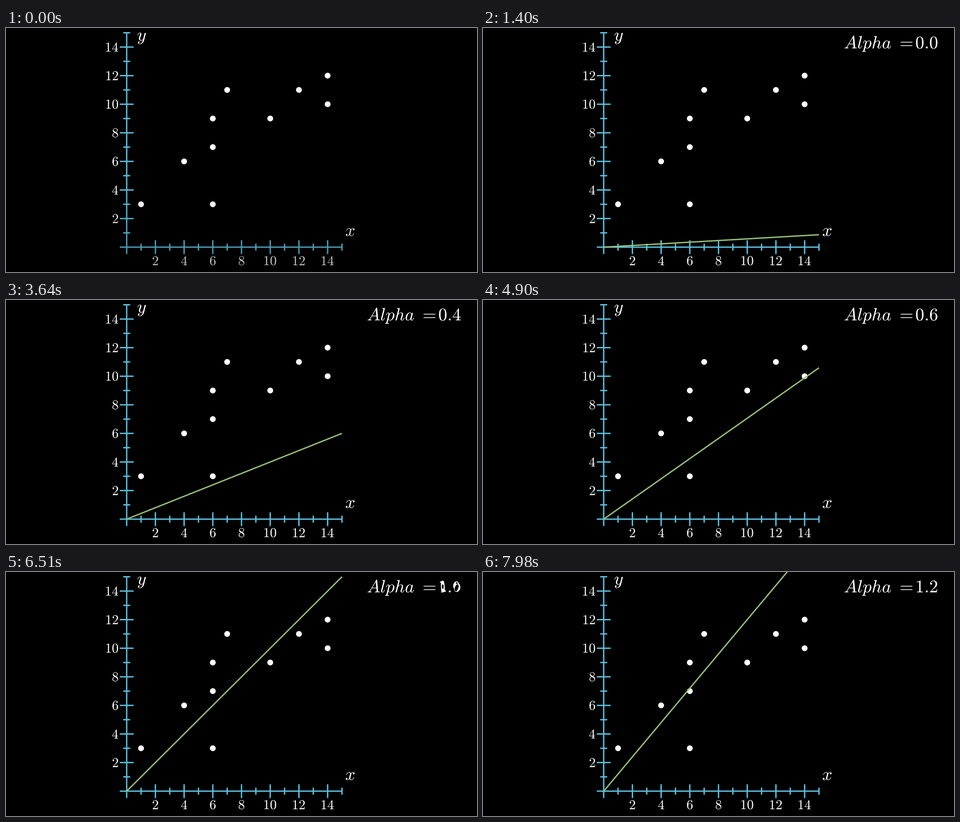
Recreate the animation shown at these times as a matplotlib script. Size 1038 by 540 pixels, loop 8000 ms.

```python
import numpy as np
import matplotlib.pyplot as plt
from matplotlib.animation import FuncAnimation
from matplotlib.collections import LineCollection
from matplotlib.patches import PathPatch
from matplotlib.path import Path
from matplotlib.textpath import TextPath

plt.rcParams["mathtext.fontset"] = "cm"

W, H, DPI = 1038, 540, 100
PX = 72 / DPI
LOOP, TICK, STEP = 8000, 20, 70

BLUE, GREEN = "#5bc3e1", "#97c079"
X0, Y0, UNIT = 266.0, H - 485, 31.63
STROKE, RADIUS, EM, LABEL_EM = 2.95, 6.4, 39.4, 30
POINTS = [(1, 3), (4, 6), (6, 3), (6, 7), (6, 9), (7, 11), (10, 9),
          (12, 11), (14, 10), (14, 12)]

# Timing in ms: the caption enters, then each cycle turns the line and the digits
INTRO, INTRO_TIME = 560, 560
TURN, TURN_TIME = 1330, 170
MORPH, MORPH_TIME = 1520, 640
CYCLE, CYCLES = 1161, 6
GLOW_TIME = 350


def smooth(u):
    u = np.clip(u, 0, 1)
    edge = 1 / (1 + np.exp(5))
    return float(np.clip((1 / (1 + np.exp(-10 * (u - 0.5))) - edge)
                         / (1 - 2 * edge), 0, 1))


def at(x, y):
    return X0 + UNIT * x, Y0 + UNIT * y


def moved(path, dx, dy):
    return Path(path.vertices + (dx, dy), path.codes)


def math_path(text, size):
    path = TextPath((0, 0), f"${text}$", size=size)
    return Path(path.vertices, path.codes)


def placed(text, size, x, y, anchor):
    """Put the glyph box at x (0 left, 0.5 middle, 1 right), centred on y."""
    path = math_path(text, size)
    box = path.get_extents()
    return moved(path, x - box.x0 - anchor * box.width, y - (box.y0 + box.y1) / 2)


def contours(path, count=80):
    rings = []
    for ring in path.to_polygons():
        length = np.r_[0, np.cumsum(np.hypot(*np.diff(ring, axis=0).T))]
        s = np.linspace(0, length[-1], count)
        rings.append(np.c_[np.interp(s, length, ring[:, 0]),
                           np.interp(s, length, ring[:, 1])])
    return rings


def blend(a, b, u):
    """Outline part of the way between two glyphs; spare rings shrink away."""
    rings_a, rings_b = contours(a), contours(b)
    parts = []
    for i in range(max(len(rings_a), len(rings_b))):
        ra = rings_a[i] if i < len(rings_a) else None
        rb = rings_b[i] if i < len(rings_b) else None
        if ra is None:
            ra = np.tile(rb.mean(axis=0), (len(rb), 1))
        if rb is None:
            rb = np.tile(ra.mean(axis=0), (len(ra), 1))
        parts.append(Path((1 - u) * ra + u * rb, closed=True))
    return Path.make_compound_path(*parts)


fig = plt.figure(figsize=(W / DPI, H / DPI), dpi=DPI, facecolor="black")
ax = fig.add_axes([0, 0, 1, 1])
ax.set_xlim(0, W)
ax.set_ylim(0, H)
ax.axis("off")


def fill(*paths, z):
    return ax.add_patch(PathPatch(Path.make_compound_path(*paths),
                                  fc="white", lw=0, snap=False, zorder=z))


# Axes, ticks and labels
segments = [[(X0 - 15.3, Y0), at(15, 0)], [(X0, Y0 - 15.3), at(0, 15)]]
labels = [placed("x", EM, 758.5, H - 451.7, 0.5), placed("y", EM, 299, H - 23, 0.5)]
for n in range(1, 16):
    half = 7.7 if n % 2 else 15.3
    x, y = at(n, n)
    segments += [[(x, Y0 - half), (x, Y0 + half)],
                 [(X0 - half, y), (X0 + half, y)]]
    if n % 2 == 0:
        labels += [placed(str(n), LABEL_EM, x, H - 515, 0.5),
                   placed(str(n), LABEL_EM, 247, y, 1)]
ax.add_collection(LineCollection(segments, colors=BLUE, linewidths=STROKE * PX,
                                 capstyle="butt", snap=False, zorder=1))
fill(*labels, z=2)
fill(*[Path.circle(at(*p), RADIUS) for p in POINTS], z=3)

line, = ax.plot([], [], color=GREEN, lw=STROKE * PX, solid_capstyle="butt",
                snap=False, zorder=4)

# Caption: right-aligned digits, with the sign and word at usual math spacing
RIGHT, BASE = 1001.5, H - 45.2
digits = {c: math_path(c, EM) for c in "012468"}
pen_tenths = RIGHT - digits["0"].get_extents().x1
pen_dot = pen_tenths - 0.278 * EM
pen_units = pen_dot - 0.5 * EM
dot = moved(math_path(".", EM), pen_dot, BASE)
sign = moved(math_path("=", EM), pen_units - 1.056 * EM, BASE)
word = math_path("Alpha", EM)
word = moved(word, 796.7 - word.get_extents().x0, BASE)
caption = fill(word, z=5)

# Soft shade over the lower part, gone after a moment
shade_pixels = np.zeros((H, 1, 4))
shade_pixels[:, 0, 3] = 0.28 * np.clip((np.arange(H) - 300) / 240, 0, 1) ** 1.5
shade = ax.imshow(shade_pixels, extent=(0, W, 0, H), aspect="auto", zorder=6)


def digit_path(old, new, u, pen):
    if old == new or u in (0, 1):
        path = digits[new if u == 1 else old]
    else:
        path = blend(digits[old], digits[new], u)
    return moved(path, pen, BASE)


def caption_path(t):
    done = int(np.clip((t - MORPH) // CYCLE, -1, CYCLES - 1))
    u = smooth((t - MORPH - done * CYCLE) / MORPH_TIME) if done >= 0 else 1
    old, new = (f"{0.2 * max(k, 0):.1f}" for k in (done, done + 1))
    return Path.make_compound_path(
        word, sign, dot,
        digit_path(old[0], new[0], u, pen_units),
        digit_path(old[2], new[2], u, pen_tenths))


def update(k):
    t = (k * TICK + TICK // 2) // STEP * STEP

    fade = max(1 - t / GLOW_TIME, 0)
    shade.set_visible(fade > 0)
    shade.set_data(shade_pixels * fade)

    intro = smooth((t - INTRO) / INTRO_TIME)
    slope = 0.2 * sum(smooth((t - TURN - i * CYCLE) / TURN_TIME)
                      for i in range(CYCLES))
    end = at(15 * intro, 15 * intro * slope)
    line.set_data([X0, end[0]], [Y0, end[1]])
    line.set_visible(intro > 0)

    caption.set_visible(intro > 0)
    if intro > 0:
        caption.set_path(moved(caption_path(t), -165 * (1 - intro), -172 * (1 - intro)))
        caption.set_alpha(intro)
    return line, caption, shade


ani = FuncAnimation(fig, update, frames=LOOP // TICK, interval=TICK,
                    repeat=True, repeat_delay=0, blit=False)
plt.show()
```
